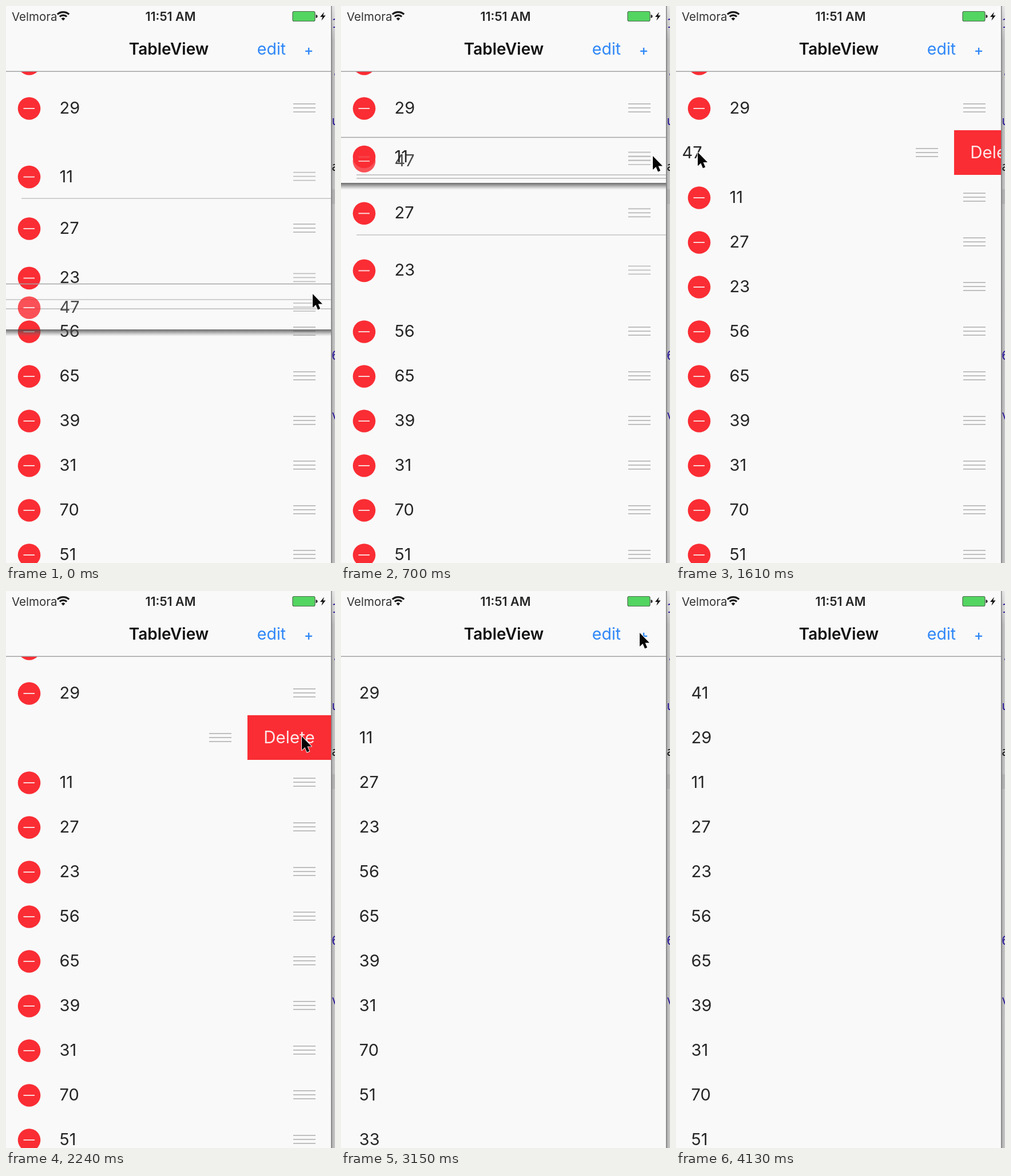
Recreate the animation shown at these times as an HTML page. Size 575 px wide and 973 px high, loop 4.2 s.

```html
<!DOCTYPE html>
<html lang="en">
<head>
<meta charset="utf-8">
<title>TableView</title>
<style>
  html, body { margin: 0; width: 100%; height: 100%; overflow: hidden; background: #f9f9f9; }
  svg { display: block; width: 100vw; height: 100vh; font-family: Inter, "Liberation Sans", sans-serif; }
  .num { font-size: 29px; fill: #262626; }
  .dot { fill: #fa2d34; }
  .dash { stroke: #fbd5d5; stroke-width: 2; }
  .grip { stroke: #bfbfbf; stroke-width: 1.9; }
  .sep { stroke: #b9b9b9; stroke-width: 1.3; }
  .code { font: 22px "DejaVu Sans Mono", monospace; fill: #2a1a9a; }
</style>
</head>
<body>
<svg viewBox="0 0 575 973">
  <defs>
    <linearGradient id="drop" x2="0" y2="1">
      <stop offset="0" stop-color="#444" stop-opacity=".8"/>
      <stop offset=".35" stop-color="#555" stop-opacity=".55"/>
      <stop offset="1" stop-color="#777" stop-opacity="0"/>
    </linearGradient>
    <linearGradient id="edge">
      <stop offset="0" stop-color="#a4a4a4"/>
      <stop offset="1" stop-color="#cacaca"/>
    </linearGradient>
    <linearGradient id="fade" x2="0" y2="1">
      <stop offset="0" stop-color="#fff" stop-opacity=".6"/>
      <stop offset="1" stop-color="#fff" stop-opacity="0"/>
    </linearGradient>
    <clipPath id="strip"><rect x="568" width="7" height="973"/></clipPath>
  </defs>

  <rect width="575" height="973" fill="#f9f9f9"/>
  <g id="list"></g>
  <line id="slotSep" class="sep" x2="568"/>
  <g id="lifted">
    <g id="lift">
      <line x2="568" y1="-40.5" y2="-40.5" stroke="#a5a5a5" stroke-width="1.3"/>
      <rect y="39" width="568" height="12" fill="url(#drop)"/>
    </g>
    <g id="cell"></g>
    <g id="remove">
      <rect y="-39" width="147" height="78" fill="#fa2d34"/>
      <text x="73" y="10" font-size="29.5" text-anchor="middle" fill="#fde6e6">Delete</text>
    </g>
  </g>

  <g id="nav">
    <rect width="568" height="114" fill="#f9f9f9"/>
    <rect y="113.6" width="568" height="1.3" fill="#979797"/>
    <text x="10" y="26" font-size="20.5" fill="#333">Velmora</text>
    <g fill="none" stroke="#1c1c1c" stroke-width="3.3">
      <path d="M89.8 14.6A15 15 0 0 1 110.2 14.6"/>
      <path d="M93.8 18.6A9.2 9.2 0 0 1 106.2 18.6"/>
      <path d="M100 25.5L96.6 21.9A5 5 0 0 1 103.4 21.9Z" fill="#1c1c1c" stroke="none"/>
    </g>
    <text x="287.5" y="26" font-size="21.5" font-weight="600" text-anchor="middle" fill="#262626">11:51 AM</text>
    <rect x="501" y="9.5" width="39" height="17" rx="2.5" fill="#53d561" stroke="#4b6b4e" stroke-width="1.2"/>
    <path d="M541.5 15Q544.5 15.5 544.5 18T541.5 21Z" fill="#222"/>
    <path d="M556 10.5L549 19H553.2L551.4 25.5L558.6 16.5H554.2Z" fill="#111"/>
    <text x="284.5" y="85" font-size="28" font-weight="600" text-anchor="middle" fill="#111">TableView</text>
    <text x="464" y="85" font-size="28.5" text-anchor="middle" fill="#2f87f7">edit</text>
    <text x="529" y="86" font-size="25" font-weight="500" text-anchor="middle" fill="#2f87f7">+</text>
  </g>

  <g clip-path="url(#strip)">
    <rect x="568" width="7" height="973" fill="url(#edge)"/>
    <rect x="568" width="7" height="60" fill="url(#fade)"/>
    <rect x="568" y="320" width="7" height="26" fill="#888" opacity=".25"/>
    <rect x="568" width="1.4" height="973" fill="#7d7d7d"/>
    <text class="code" x="569" y="38">1</text>
    <text class="code" x="569" y="121">.</text>
    <text class="code" x="569" y="208">u</text>
    <text class="code" x="569" y="288" style="fill:#111">a</text>
    <text class="code" x="569" y="618">6</text>
    <text class="code" x="569" y="722">v</text>
  </g>

  <path id="pointer" d="M0 0V24L5.4 18.9L9 27.6L13.2 25.8L9.6 17.4H17Z"
        fill="#050505" stroke="#fff" stroke-width="1.8" paint-order="stroke" stroke-linejoin="round"/>
</svg>

<script>
const LOOP = 4200, STEP = 70, ROW = 78, TOP = 178, LAG = 240;
const EDIT_SHIFT = 67, DELETE_SHIFT = 147;
const $ = id => document.getElementById(id);

// time, centre of the lifted cell
const dragKeys = [
  [-300, 256], [-200, 256], [-113, 295], [-74, 373], [-48, 451], [0, 526], [50, 520],
  [170, 290], [280, 256], [350, 262], [377, 295], [414, 373], [420, 419], [490, 500],
  [560, 440], [700, 270], [770, 256]
];
// time, tip x, tip y
const pointerKeys = [
  [0, 536, 503], [50, 540, 505], [170, 548, 275], [280, 553, 250], [377, 557, 285],
  [420, 559, 418], [490, 560, 490], [560, 556, 430], [700, 545, 262], [770, 500, 262],
  [980, 185, 315], [1190, 60, 262], [1330, 38, 254], [1680, 38, 256], [1890, 250, 280],
  [2100, 500, 262], [2240, 517, 254], [2380, 517, 254], [2590, 460, 98], [2730, 462, 72],
  [2870, 464, 70], [3010, 500, 70], [3150, 522, 73], [3400, 522, 74], [3640, 552, 90],
  [3850, 582, 130]
];

function along(keys, t) {
  const i = keys.findIndex(k => k[0] > t);
  if (i < 0) return keys[keys.length - 1].slice(1);
  if (i === 0) return keys[0].slice(1);
  const a = keys[i - 1], b = keys[i], p = (t - a[0]) / (b[0] - a[0]);
  return a.slice(1).map((v, j) => v + (b[j + 1] - v) * p);
}
const ramp = (t, from, to) => Math.min(1, Math.max(0, (t - from) / (to - from)));
function ease(t, from, to) {
  const p = ramp(t, from, to);
  return p < .5 ? 2 * p * p : 1 - 2 * (1 - p) ** 2;
}
const move = (el, x, y, extra = "") => el.setAttribute("transform", `translate(${x} ${y})${extra}`);
const show = (el, on) => el.setAttribute("display", on ? "inline" : "none");

function cellMarkup(n) {
  const bar = y => `<line x1="502" x2="541" y1="${y}" y2="${y}"/>`;
  return `<g class="minus"><circle class="dot" cx="40.5" cy="1" r="19.8"/>
    <line class="dash" x1="30.5" x2="50" y1="1" y2="1"/></g>
    <text class="num" x="93.5" y="10">${n}</text>
    <g class="grip">${bar(-7)}${bar(0)}${bar(7)}</g>`;
}

// Slot -1 sits under the bar; slot 1 belongs to the lifted cell.
const rows = [41, 29, 0, 11, 27, 23, 56, 65, 39, 31, 70, 51, 33]
  .map((n, i) => ({ n, slot: i - 1 }))
  .filter(r => r.n)
  .map(r => {
    const el = document.createElementNS("http://www.w3.org/2000/svg", "g");
    el.innerHTML = cellMarkup(r.n) + '<line class="sep" x2="568" y1="38.5" y2="38.5"/>';
    $("list").append(el);
    const part = c => el.querySelector("." + c);
    return { ...r, el, minus: part("minus"), num: part("num"), grip: part("grip"), sep: part("sep") };
  });
$("cell").innerHTML = cellMarkup(47);
const cellGrip = $("cell").querySelector(".grip");

// A row gives way while the lifted cell is past it, smoothed over LAG ms.
function giveWay(home, t) {
  let past = 0;
  for (let s = 1; s < LAG; s += 2) past += along(dragKeys, t - s)[0] > home - 39;
  return ROW * past / (LAG / 2);
}
// Hairlines survive scaling only at some offsets.
const hairline = off => [1, 2].includes(Math.round(off) % 5);

function draw(t) {
  const drag = along(dragKeys, t)[0];
  const lifting = t < 1050;
  const slide = ease(t, 1450, 1750);
  const gone = ease(t, 2310, 2620);
  const done = ease(t, 2910, 3210);
  const add = ease(t, 3360, 3680);

  for (const r of rows) {
    const home = TOP + ROW * r.slot;
    let y = home + ROW * add, off = add > 0 ? ROW * (1 - add) : 0;
    if (r.slot > 1) {
      y -= ROW * gone;
      if (gone > 0 && gone < 1) off = ROW * (1 - gone);
      if (r.slot < 7 && lifting) {
        off = giveWay(home, t);
        y -= off;
      }
    }
    move(r.el, 0, y);
    move(r.minus, -EDIT_SHIFT * done, 0);
    move(r.num, -EDIT_SHIFT * done, 0);
    move(r.grip, EDIT_SHIFT * done, 0);
    r.grip.setAttribute("opacity", Math.max(0, 1 - done * 1.2));
    show(r.sep, hairline(off));
    r.sep.setAttribute("x1", lineStart(y + 38.5));
  }

  function lineStart(y) {
    return lifting && y > drag - 40 && y < drag + 10 ? 0 : 27;
  }

  const slotY = TOP + ROW * Math.round((drag - TOP) / ROW) + 39;
  const slotSep = $("slotSep");
  show(slotSep, lifting);
  slotSep.setAttribute("y1", slotY);
  slotSep.setAttribute("y2", slotY);
  slotSep.setAttribute("x1", lineStart(slotY));

  const open = 1 - gone;
  show($("lifted"), gone < 1);
  move($("lifted"), 0, drag - 39 * gone, ` scale(1 ${open})`);
  $("lift").setAttribute("opacity", 1 - ramp(t, 700, 840));
  $("cell").setAttribute("opacity", lifting ? .82 : 1);
  move($("cell"), -DELETE_SHIFT * slide, 0);
  cellGrip.setAttribute("opacity", Math.max(0, 1 - gone * 1.3));
  show($("remove"), slide > 0);
  move($("remove"), 569 - DELETE_SHIFT * slide, 0);

  move($("pointer"), ...along(pointerKeys, t));
}

const start = performance.now();
function tick() {
  const t = (performance.now() - start) % LOOP;
  draw(Math.floor(t / STEP) * STEP);
  requestAnimationFrame(tick);
}
tick();
</script>
</body>
</html>
```
